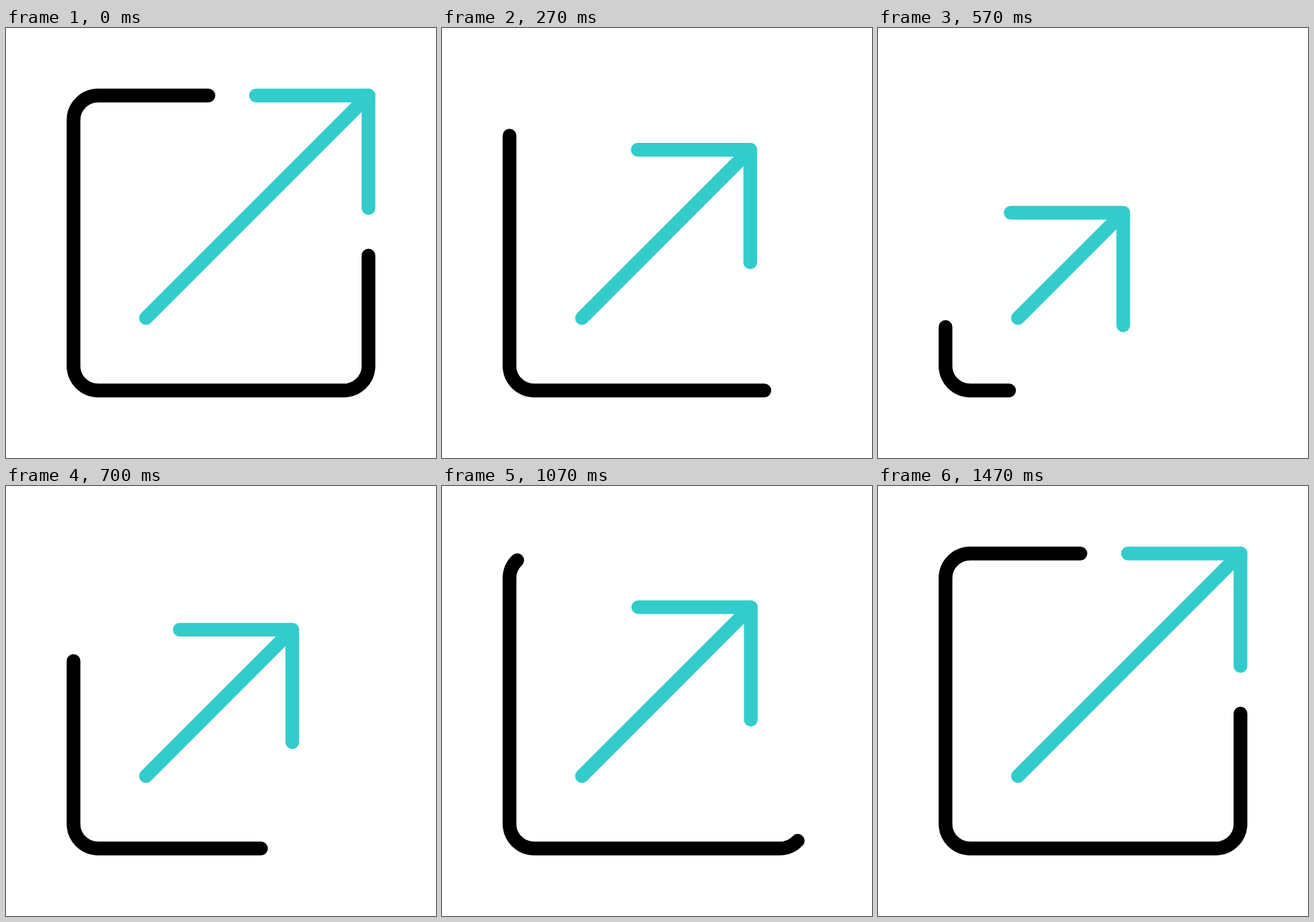
An HTML page without scripts for the animation above (2 s loop, 640x640 px).

```html
<!DOCTYPE html>
<html lang="en">
<head>
<meta charset="utf-8">
<title>Expand icon</title>
<style>
  @property --t {
    syntax: "<number>";
    inherits: true;
    initial-value: 0;
  }

  html, body {
    margin: 0;
    width: 100%;
    height: 100%;
    overflow: hidden;
    background: #fff;
  }

  svg {
    display: block;
    width: 100%;
    height: 100%;
    fill: none;
    stroke-width: 20.4;
    stroke-linecap: round;
    stroke-linejoin: round;

    /* 30 ticks per second, held between ticks */
    animation: tick 2s steps(60) -4ms infinite;

    /* progress of each stage: shrink, grow, shrink, grow, settle */
    --u1: clamp(0, var(--t) / 16.85, 1);
    --u2: clamp(0, (var(--t) - 16.85) / 10.4, 1);
    --u3: clamp(0, (var(--t) - 27.25) / 6, 1);
    --u4: clamp(0, (var(--t) - 33.25) / 5.9, 1);
    --u5: clamp(0, (var(--t) - 39.15) / 4.5, 1);

    /* smoothstep of each stage */
    --s1: (var(--u1) * var(--u1) * (3 - 2 * var(--u1)));
    --s2: (var(--u2) * var(--u2) * (3 - 2 * var(--u2)));
    --s3: (var(--u3) * var(--u3) * (3 - 2 * var(--u3)));
    --s4: (var(--u4) * var(--u4) * (3 - 2 * var(--u4)));
    --s5: (var(--u5) * var(--u5) * (3 - 2 * var(--u5)));

    /* how far the border is trimmed and the arrow pulled in */
    --trim: (530 * var(--s1) - 527 * var(--s2) + 213 * var(--s3) - 216 * var(--s4));
    --pull: (174.6 * var(--s1) - 174.6 * var(--s2) + 90 * var(--s3) - 77.5 * var(--s4) - 12.5 * var(--s5));
  }

  @keyframes tick {
    from { --t: 0; }
    to { --t: 60; }
  }

  .border {
    stroke: #000;
    stroke-dasharray: calc((616.4 - var(--trim)) * 1px) 2000px;
  }

  .arrow { stroke: #3cc; }

  .shaft {
    stroke-dasharray: calc((468.4 - 1.41421 * var(--pull)) * 1px) 2000px;
  }

  .head {
    transform: translate(calc(var(--pull) * -1px), calc(var(--pull) * 1px));
  }
</style>
</head>
<body>
<svg viewBox="0 0 640 640">
  <defs>
    <path id="half" d="M111.2 528.8A36.5 36.5 0 0 1 100.5 503V137A36.5 36.5 0 0 1 137 100.5H301.3"/>
  </defs>
  <g class="border">
    <use href="#half"/>
    <use href="#half" transform="matrix(0 -1 -1 0 640 640)"/>
  </g>
  <g class="arrow">
    <path class="shaft" d="M208.3 431.7L539.5 100.5"/>
    <path class="head" d="M372 100.5H539.5V268"/>
  </g>
</svg>
</body>
</html>
```
